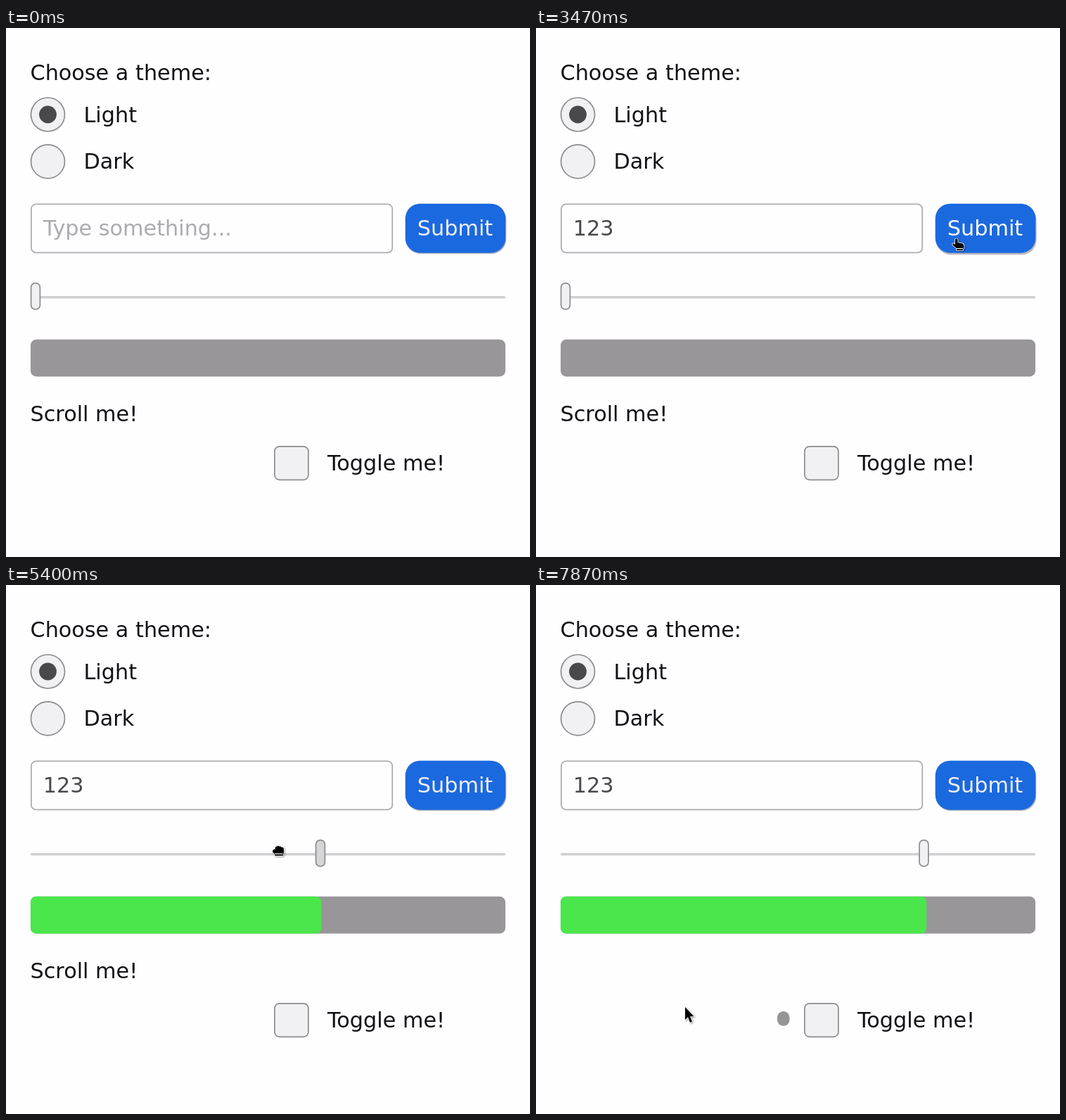
Recreate the animation shown at these times as an HTML page. Size 745x752 px, loop 8000 ms.

```html
<!DOCTYPE html>
<html lang="en">
<head>
<meta charset="utf-8">
<title>Form controls</title>
<style>
  html, body { margin: 0; width: 100%; height: 100%; overflow: hidden; background: #fefdff; }
  svg { display: block; width: 745px; height: 752px; }
  text { font: 30.28px "DejaVu Sans", sans-serif; fill: #111113; white-space: pre; }
  .box { fill: #f1f0f3; stroke: #8d8c90; stroke-width: 1.7; }
  .cursor > * { display: none; filter: drop-shadow(1px 1.5px .8px #0006); }
  .cursor path { stroke: #fff; stroke-width: 1.6; stroke-linejoin: round; paint-order: stroke; }
  .cursor .cuff { fill: none; stroke-width: 1.2; }
</style>
</head>
<body>
<svg viewBox="0 0 745 752">
  <text x="34.500" y="74">Choose a theme:</text>
  <circle class="box" cx="59.5" cy="123" r="24"/>
  <circle cx="59.5" cy="123" r="12.4" fill="#49484c"/>
  <text x="110.500" y="133.500">Light</text>
  <circle class="box" cx="59.5" cy="189.800" r="24"/>
  <text x="110.500" y="200.300">Dark</text>

  <rect id="field" x="35.9" y="250.400" width="513.400" height="69" rx="7" fill="#fefdff" stroke-width="1.8"/>
  <text id="entry" x="52.7" y="295"></text>
  <rect id="caret" y="267.500" width="1.8" height="35" fill="#49484c"/>

  <rect id="shadow" x="567.700" y="249.700" width="142.600" height="70" rx="21" fill="#b9b8bd" style="filter:blur(.6px)"/>
  <rect x="567.700" y="249.700" width="142.600" height="70" rx="21" fill="#1b69df"/>
  <text id="submit" x="638.500" y="295" text-anchor="middle">Submit</text>

  <rect x="35" y="381" width="675" height="3.600" rx="1.5" fill="#d0cfd2"/>
  <rect id="thumb" class="box" y="362.700" width="12.800" height="37.200" rx="6"/>
  <rect x="35" y="442.800" width="675" height="52.600" rx="8" fill="#989699"/>
  <rect id="fill" x="34.900" y="442.700" height="52.800" rx="8" fill="#4be64b"/>

  <text id="scroll" x="34.500" y="558.500">Scroll me!</text>
  <rect id="knob" x="343" width="17.600" height="20.800" rx="8.8" fill="#969497"/>
  <rect class="box" x="381.900" y="594.900" width="48" height="47.400" rx="7"/>
  <text x="457" y="629">Toggle me!</text>

  <g id="cursor" class="cursor">
    <path id="arrow" d="M0 0V18L4 14.300L7 22L10 20.800L7 13.300H12.500Z"/>
    <path id="beam" d="M-5 -13H5V-11.500H1V11.500H5V13H-5V11.500H-1V-11.500H-5Z"/>
    <g id="point">
      <path d="M0 1.500Q1.800 -1 3.600 1.500V6L10 7.300Q12.500 8 12.300 10.500V13L11 17H2V14.500L-3.500 9.500Q-4.500 7.200 -2 7.200L0 8.800Z"/>
      <path class="cuff" d="M2 14.600H11"/>
    </g>
    <g id="grab">
      <path d="M-5 -5.500Q-3.500 -8 -2.300 -5.500V-7.500Q-.7 -10 .8 -7.500V-7Q2.500 -9 4 -6.500V-5Q6 -6.500 7 -4V3L5 9H-4V7L-8.500 1.500Q-8.500 -1 -6 -.5L-5 .5Z"/>
      <path class="cuff" d="M-4 6.700H6"/>
    </g>
    <g id="hold">
      <path d="M-4.500 -3.500Q-3.300 -6 -2 -4.800Q-.5 -8 1.300 -5Q3 -6.500 4.300 -4Q7.500 -5 7.800 -1V4L6.500 8H-5V6L-8 3V.5Q-7 -1.500 -4.500 -1Z"/>
      <path class="cuff" d="M-5 5.300H6.500"/>
    </g>
  </g>
</svg>
<script>
const $ = id => document.getElementById(id);
const set = (id, attrs) => { for (const k in attrs) $(id).setAttribute(k, attrs[k]); };
const show = (id, on) => { $(id).style.display = on ? 'inline' : 'none'; };
const clamp = (v, a, b) => Math.min(b, Math.max(a, v));
const ramp = (t, a, b) => clamp((t - a) / (b - a), 0, 1);
const ease = u => (1 - Math.cos(Math.PI * u)) / 2;
const gray = v => `rgb(${Math.round(v)},${Math.round(v) - 1},${Math.round(v) + 2})`;
const inside = (p, x, y, w, h) => p.x > x && p.x < x + w && p.y > y && p.y < y + h;

// Each hand movement: when, where to, and how far it bows downwards
const moves = [
  { from: 470, to: 745, x: 244, y: 285, bow: 0 },
  { from: 2070, to: 2370, x: 596, y: 299, bow: -8 },
  { from: 3830, to: 4322, x: 42, y: 381, bow: 28 },
  { from: 4349, to: 5019, x: 683, y: 384, bow: 6 },
  { from: 5180, to: 5582, x: 171, y: 380, bow: -5 },
  { from: 5653, to: 6108, x: 551.5, y: 383, bow: -1 },
  { from: 6430, to: 6930, x: 212, y: 600, bow: 175 }
];

function pointer(t) {
  let p = { x: 640, y: 461 };
  for (const m of moves) {
    if (t < m.from) break;
    const e = ease(ramp(t, m.from, m.to));
    p = {
      x: p.x + (m.x - p.x) * e,
      y: p.y + (m.y - p.y) * e + m.bow * Math.sin(Math.PI * e)
    };
  }
  return p;
}

function cursorKind(p, held) {
  if (inside(p, 568, 250, 142, 70)) return 'point';
  if (inside(p, 35, 250, 514, 70)) return 'beam';
  if (inside(p, 35, 362, 675, 38)) return held ? 'hold' : 'grab';
  return 'arrow';
}

function draw(t) {
  const p = pointer(t);

  // Text field
  const typed = clamp(Math.floor((t - 1515) / 85), 0, 3);
  const focus = ramp(t, 700, 830) - ramp(t, 2830, 2970);
  $('entry').textContent = typed ? '123'.slice(0, typed) : 'Type something...';
  $('entry').style.fill = typed ? '#49484c' : '#acabaf';
  set('field', { stroke: gray(174 - 54 * focus) });
  set('caret', { x: 52.7 + 19.27 * typed });
  show('caret', t >= 770 && t < 2830);

  // Button
  const hover = ramp(t, 2315, 2400) - ramp(t, 3910, 4000);
  const press = ramp(t, 2830, 2970) - ramp(t, 3270, 3600);
  const lift = hover * (1 - press);
  set('shadow', { transform: `translate(${1 + .5 * lift} ${1.4 + 2 * lift})` });
  $('submit').style.fill = gray(239 + 14 * hover);

  // Slider and progress bar; the thumb trails the pointer
  const x = pointer(clamp(t, 4379, 6400) - 30).x;
  const near = ramp(t, 4110, 4175) - ramp(t, 6455, 6550);
  const grip = ramp(t, 4349, 4420) - ramp(t, 6230, 6300);
  set('thumb', { x: x - 6.4 });
  $('thumb').style.fill = gray(241 - 14 * near - 13 * grip);
  set('fill', { width: (x - 42) / 661 * 675 });

  // Scrolling
  show('scroll', t < 7670);
  show('knob', t >= 7670);
  set('knob', { y: t < 7870 ? 568.5 : 606 });

  // Cursor
  const kind = t < 470 ? '' : cursorKind(p, t > 4349 && t < 6230);
  for (const g of $('cursor').children) show(g.id, g.id === kind);
  set('cursor', { transform: `translate(${p.x} ${p.y})` });
}

const start = performance.now();
function tick() {
  draw((performance.now() - start) % 8000);
  requestAnimationFrame(tick);
}
tick();
</script>
</body>
</html>
```
